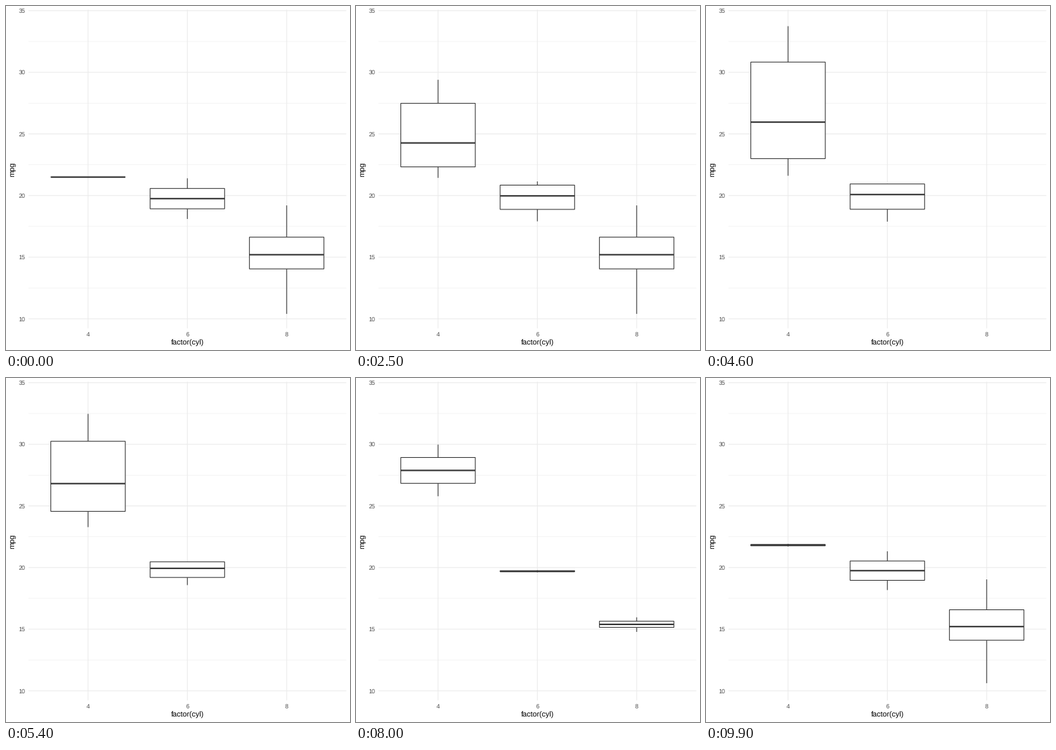
Recreate the animation shown at these times as a matplotlib script. Size 504 by 504 pixels, loop 10 s.

```python
import numpy as np
import matplotlib.pyplot as plt
from matplotlib.animation import FuncAnimation
from matplotlib.patches import Rectangle

plt.rcParams.update({
    "font.family": "Liberation Sans",
    "text.hinting": "none",
    "toolbar": "None",
})

SIZE, DPI = 504, 72
LEFT, RIGHT, TOP, BOTTOM = 32.9, 498.52, 5.48, 472.3
Y_LOW, Y_HIGH = 9.225, 35.075
GRID, INK, LABEL = "#ebebeb", "#333333", "#4d4d4d"
THIN, LINE, THICK = 0.53, 1.07, 2.13
CYLS = (4, 6, 8)

# mpg by number of gears, then by number of cylinders
GEARS = [
    {4: [21.5],
     6: [21.4, 18.1],
     8: [18.7, 14.3, 16.4, 17.3, 15.2, 10.4, 10.4, 14.7, 15.5, 15.2, 13.3, 19.2]},
    {4: [22.8, 24.4, 22.8, 32.4, 30.4, 33.9, 27.3, 21.4],
     6: [21.0, 21.0, 19.2, 17.8]},
    {4: [26.0, 30.4], 6: [19.7], 8: [15.8, 15.0]},
]
STATS = [{c: np.percentile(v, [0, 25, 50, 75, 100]) for c, v in g.items()}
         for g in GEARS]

FRAMES, INTERVAL = 100, 100
MOVES = [(11, 22), (45, 22), (79, 21)]  # first frame and length of each tween


def px(slot):
    return LEFT + (slot + 0.6) * (RIGHT - LEFT) / 3.2


def py(mpg):
    return TOP + (Y_HIGH - mpg) * (BOTTOM - TOP) / (Y_HIGH - Y_LOW)


def line(xs, ys, color, width, z):
    return ax.plot(xs, ys, color=color, lw=width, zorder=z, snap=False,
                   solid_capstyle="butt")[0]


class Box:
    def __init__(self, slot):
        x, half = px(slot), 0.375 * (RIGHT - LEFT) / 3.2
        self.upper = line([x, x], [0, 0], INK, LINE, 3)
        self.lower = line([x, x], [0, 0], INK, LINE, 3)
        self.body = ax.add_patch(Rectangle(
            (x - half, 0), 2 * half, 0, fc="white", ec=INK, lw=LINE,
            joinstyle="miter", snap=False, zorder=4))
        self.median = line([x - half, x + half], [0, 0], INK, THICK, 5)
        self.parts = [self.upper, self.lower, self.body, self.median]

    def show(self, stats):
        for part in self.parts:
            part.set_visible(stats is not None)
        if stats is None:
            return
        low, q1, mid, q3, high = py(stats)
        self.upper.set_ydata([high, q3])
        self.lower.set_ydata([q1, low])
        self.body.set_y(q3)
        self.body.set_height(q1 - q3)
        self.median.set_ydata([mid, mid])


def phase(frame):
    """Current state, next state and linear progress between them."""
    for i, (start, length) in enumerate(MOVES):
        if frame < start + length:
            return i, (i + 1) % len(STATS), max(0, frame - start) / length
    return 0, 0, 0


def blend(a, b, t):
    # groups without a partner come and go only when the tween is done
    if a is None or b is None:
        return a if t < 1 else b
    return a + (b - a) * t


def update(frame):
    i, j, t = phase(frame)
    for cyl, box in boxes.items():
        box.show(blend(STATS[i].get(cyl), STATS[j].get(cyl), t))
    return [part for box in boxes.values() for part in box.parts]


fig = plt.figure(figsize=(SIZE / DPI, SIZE / DPI), dpi=DPI, facecolor="white")
ax = fig.add_axes([0, 0, 1, 1])
ax.set(xlim=(0, SIZE), ylim=(SIZE, 0))
ax.axis("off")

for v in np.arange(12.5, 35, 5):
    line([LEFT, RIGHT], [py(v)] * 2, GRID, THIN, 1)
for v in range(10, 36, 5):
    line([LEFT, RIGHT], [py(v)] * 2, GRID, LINE, 2)
    ax.text(LEFT - 4.95, py(v) + 3.15, str(v), size=8.8, color=LABEL,
            ha="right", va="baseline")
for slot, cyl in enumerate(CYLS):
    line([px(slot)] * 2, [TOP, BOTTOM], GRID, LINE, 2)
    ax.text(px(slot), 483.8, str(cyl), size=8.8, color=LABEL,
            ha="center", va="baseline")

ax.text((LEFT + RIGHT) / 2, 496.4, "factor(cyl)", size=11, color="black",
        ha="center", va="baseline")
ax.text(13.4, (TOP + BOTTOM) / 2, "mpg", size=11, color="black", rotation=90,
        rotation_mode="anchor", ha="center", va="baseline")

boxes = {cyl: Box(slot) for slot, cyl in enumerate(CYLS)}

anim = FuncAnimation(fig, update, frames=FRAMES, interval=INTERVAL,
                     init_func=lambda: update(0), repeat=True, repeat_delay=0)
plt.show()
```
